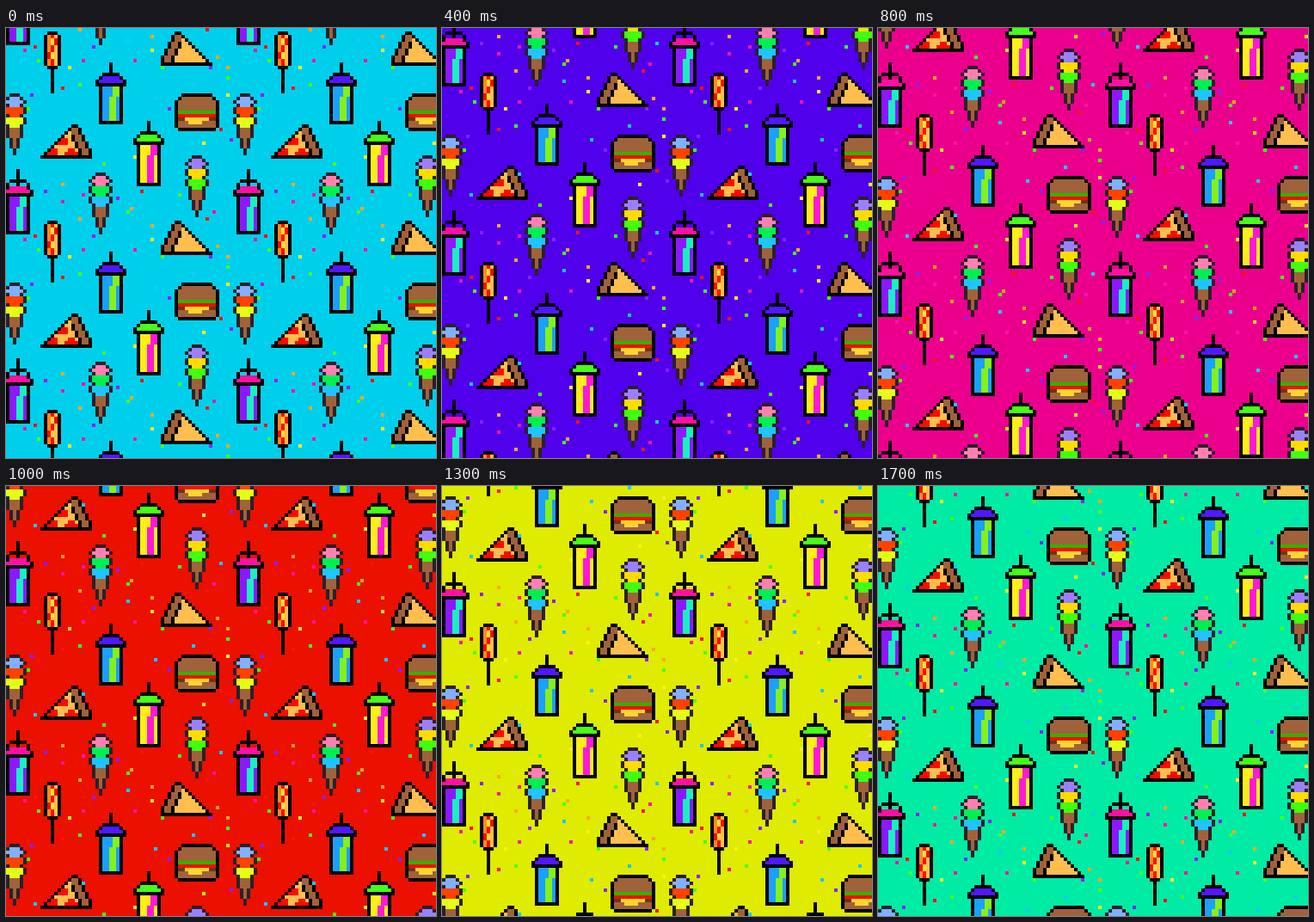
Write an HTML page with a canvas that moves like this. It is 500 px wide and 500 px high and loops after 1.8 s.

```html
<!DOCTYPE html>
<html lang="en">
<head>
<meta charset="utf-8">
<title>Fast food pattern</title>
<style>
html, body { margin: 0; width: 100%; height: 100%; overflow: hidden; }
canvas { display: block; width: 500px; height: 500px; }
</style>
</head>
<body>
<canvas id="stage" width="500" height="500"></canvas>
<script>
const CELL = 4, TILE_W = 67, TILE_H = 55, STEPS = 18, STEP_MS = 100;
const BLACK = '#000', BROWN = '#a0623a', CHEESE = '#ffbe4d', RED = '#ff0a00';

const tile = document.createElement('canvas');
tile.width = TILE_W * CELL;
tile.height = TILE_H * CELL;
const pen = tile.getContext('2d');

// Rectangle in cell units.
function box(color, x, y, w = 1, h = 1) {
  pen.fillStyle = color;
  pen.fillRect(x * CELL, y * CELL, w * CELL, h * CELL);
}

// The same cell on both sides of a symmetric sprite.
function pair(color, width, x, y, h = 1) {
  box(color, x, y, 1, h);
  box(color, width - 1 - x, y, 1, h);
}

function at(x, y, draw) {
  pen.save();
  pen.translate(x * CELL, y * CELL);
  draw();
  pen.restore();
}

function cup(lid, base, stripe, height, rim) {
  box(BLACK, 4, 0, 1, 4);
  box(BLACK, 2, 3, 5);
  pair(BLACK, 9, 1, 4, rim - 4);
  box(lid, 2, rim - 2, 5);
  box(lid, 1, rim - 1, 7);
  pair(BLACK, 9, 0, rim - 1);
  box(BLACK, 4, 4, 1, rim - 6);
  box(BLACK, 0, rim, 9);
  const bottom = height - 1;
  box(base, 2, rim + 1, 5, bottom - rim - 1);
  box(stripe, 5, rim + 1, 2, 3);
  box(stripe, 4, rim + 4, 2, bottom - rim - 4);
  pair(BLACK, 9, 1, rim + 1, bottom - rim);
  box(BLACK, 1, bottom, 7);
}

function cone(scoops) {
  const edge = '#2b2029';
  box(edge, 2, 0, 3);
  scoops.forEach((color, i) => {
    const y = 1 + i * 3;
    box(color, 2, y, 3, 3);
    box(color, 1, y, 5, 2);
    pair(edge, 7, i ? 0 : 1, y);
    pair(edge, 7, 0, y + 1);
    pair(edge, 7, 1, y + 2);
  });
  box(BROWN, 2, 10, 3, 4);
  pair(edge, 7, 1, 10, 3);
  pair(edge, 7, 2, 13, 3);
  box(BROWN, 3, 13, 1, 3);
  box(edge, 3, 16, 1, 2);
}

function hotDog() {
  box(BLACK, 1, 0, 3, 11);
  box(BLACK, 0, 1, 5, 9);
  box(CHEESE, 1, 1, 3, 9);
  box('#ff8a1f', 1, 1, 1, 9);
  for (let y = 1; y < 10; y++) {
    const x = [2, 3, 2, 1][(y >> 1) % 4];
    box('#ffe23a', 2, y);
    box(RED, x, y);
  }
  box(BLACK, 2, 11, 1, 7);
}

function pizza(topped) {
  for (let y = 0; y < 9; y++) {
    const left = 9 - y, right = 10 + Math.ceil(y / 2);
    box(CHEESE, left, y, right - left);
    box(BROWN, Math.max(left, right - 2), y, 2);
    if (y > 2) box(BLACK, right - 3, y);
    box(BLACK, left, y);
    box(BLACK, right, y);
  }
  box(BLACK, 9, 0, 2);
  box(BLACK, 0, 9, 15);
  if (topped) {
    box(RED, 6, 4, 2, 2);
    box(RED, 5, 5, 2);
    box(RED, 3, 7, 2);
    box(RED, 2, 8, 3);
    box(RED, 8, 7, 2);
    box(RED, 7, 8, 4);
  }
}

function burger() {
  box(BLACK, 2, 0, 9);
  box(BLACK, 1, 1, 11, 10);
  box(BLACK, 0, 2, 13, 8);
  box(BROWN, 2, 1, 9);
  box(BROWN, 1, 2, 11, 3);
  box('#2fb400', 1, 5, 11);
  box(RED, 1, 6, 11);
  box('#6b3518', 1, 7, 11);
  box('#ffd52e', 3, 7, 7);
  box(BROWN, 1, 8, 11, 2);
  box('#ffd52e', 4, 8, 4);
}

// Confetti cells as x, y pairs per colour.
const confetti = {
  '#ff1010': [8, 5, 16, 17, 39, 47, 58, 0, 62, 29],
  '#46ff18': [9, 9, 21, 16, 28, 39, 35, 53, 6, 23, 45, 11, 64, 14, 50, 48],
  '#ff12a8': [22, 9, 37, 9, 16, 50, 5, 6, 44, 33, 60, 53, 22, 48],
  '#ffa81c': [16, 45, 61, 8, 36, 52, 21, 0, 64, 11, 42, 2],
  '#ffee20': [37, 37, 42, 6, 31, 18, 64, 19, 18, 11, 57, 33, 6, 0],
  '#8a20ff': [11, 47, 7, 19, 32, 49, 65, 32, 47, 23, 59, 11, 25, 5],
  '#18c8ff': [35, 3, 43, 20, 22, 30, 62, 47, 8, 36, 54, 16]
};

function scene() {
  for (const [color, cells] of Object.entries(confetti))
    for (let i = 0; i < cells.length; i += 2) box(color, cells[i], cells[i + 1]);

  at(-1, 41, () => cup('#ff10a0', '#8d18ff', '#18f0c0', 19, 7));
  at(26, 10, () => cup('#5018ff', '#1aa0ff', '#84f01c', 18, 6));
  at(37, 27, () => cup('#46ff18', '#ffee18', '#ff18d8', 19, 6));
  at(-1, 19, () => cone(['#80b0ff', '#ff4200', '#e2ff18']));
  at(24, 42, () => cone(['#ff80b0', '#00f050', '#20c4ff']));
  at(52, 37, () => cone(['#9a80ff', '#ffdc00', '#40ff10']));
  at(11, 1, hotDog);
  at(10, 28, () => pizza(true));
  at(49, 19, burger);
  at(60, 1, () => {
    pen.scale(-1, 1);
    pizza(false);
  });
}

// Repeat the scene so sprites wrap around the tile edges.
for (const x of [0, TILE_W])
  for (const y of [0, -TILE_H]) at(x, y, scene);

const hueKeys = [[0, 187], [3, 244], [6, 293], [8, 324], [10, 364], [13, 423], [17, 522], [18, 547]];

function hueAt(step) {
  const i = hueKeys.findIndex(([end]) => end > step);
  const [s0, h0] = hueKeys[i - 1], [s1, h1] = hueKeys[i];
  return h0 + (h1 - h0) * (step - s0) / (s1 - s0);
}

const ctx = document.getElementById('stage').getContext('2d');

function draw(now) {
  const step = Math.floor(now / STEP_MS) % STEPS;
  const shift = Math.min(step, 16) * 3 * CELL;
  ctx.fillStyle = `hsl(${hueAt(step) % 360}, 100%, 46%)`;
  ctx.fillRect(0, 0, 500, 500);
  for (let y = shift - tile.height; y < 500; y += tile.height)
    for (let x = 0; x < 500; x += tile.width) ctx.drawImage(tile, x, y);
}

const start = performance.now();
function loop() {
  draw(performance.now() - start);
  requestAnimationFrame(loop);
}
loop();
</script>
</body>
</html>
```
